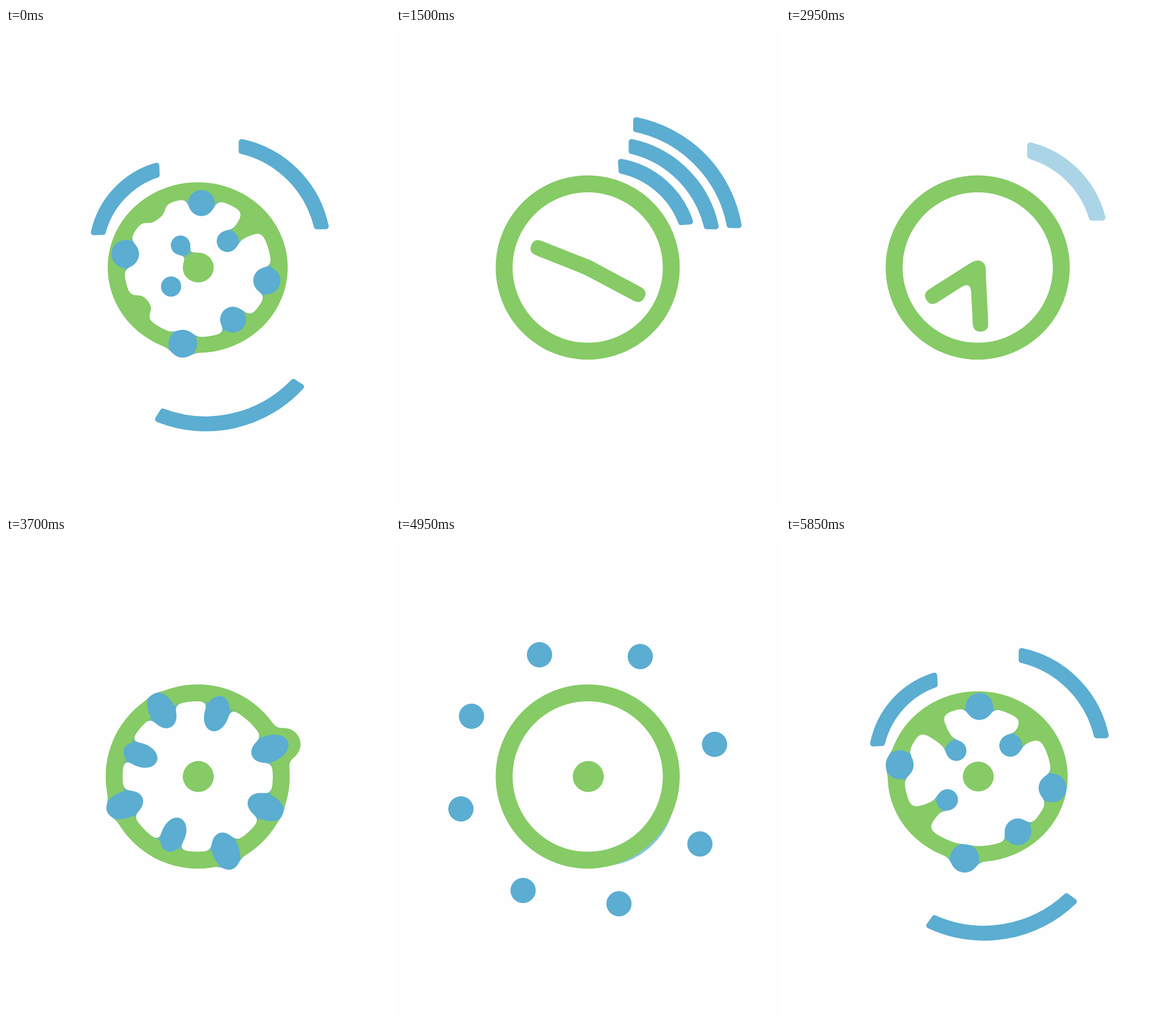
Write an HTML page that moves like this. It is 669x837 px and loops after 5900 ms.

```html
<!DOCTYPE html>
<html lang="en">
<head>
<meta charset="utf-8">
<title>Dots, clock and waves</title>
<style>
  html, body { margin: 0; width: 100%; height: 100%; overflow: hidden; background: #fefefe; }
  svg { display: block; width: 669px; height: 837px; }
</style>
</head>
<body>
<svg viewBox="0 0 669 837">
  <filter id="goo" filterUnits="userSpaceOnUse" x="0" y="0" width="669" height="837" color-interpolation-filters="sRGB">
    <feGaussianBlur stdDeviation="7"/>
    <feColorMatrix values="1 0 0 0 0  0 1 0 0 0  0 0 1 0 0  0 0 0 20 -9.5" result="blob"/>
    <feComposite in="SourceGraphic" in2="blob" operator="atop"/>
  </filter>
  <g id="waves"></g>
  <g id="body" filter="url(#goo)"></g>
</svg>
<script>
const LOOP = 5900, STEP = 50, ORBIT = 228;
const GREEN = '#86cb66', BLUE = '#5badd1';
const waves = document.getElementById('waves'), body = document.getElementById('body');

const clamp = x => Math.max(0, Math.min(1, x));
const mix = (a, b, x) => a + (b - a) * x;
const sine = x => (1 - Math.cos(Math.PI * clamp(x))) / 2;
const quad = x => (x = clamp(x)) < .5 ? 2 * x * x : 1 - 2 * (1 - x) ** 2;
// Eased progress of a move that begins at a given time
const ease = (t, from, length) => sine((t - from) / length);

// Rounded arc pointing along +x: chord distance, half chord, bulge
function arcPath(u, h, bulge) {
  const R = (h * h + bulge * bulge) / (2 * bulge), a = Math.asin(h / R), c = Math.SQRT1_2;
  const ox = u - 5 * c + 5 * Math.sin(a), oy = h - 5 * c - 5 * Math.cos(a);
  const ix = ox - 16 * c, iy = oy - 16 * c;
  const s = u + bulge - 21 - ix, r = (iy * iy + s * s) / (2 * s);
  return `M${ox} ${-oy}A${R - 5} ${R - 5} 0 0 1 ${ox} ${oy}L${ix} ${iy}A${r} ${r} 0 0 0 ${ix} ${-iy}Z`;
}

// From the inside out: starting scale, time of fading away, angle
const ARCS = [
  { small: .78, leave: 2600, angle: T => mix(-138, -45, sine(clamp((T - 5840) / 1900) ** .75)) },
  { small: .64, leave: 2200, angle: () => -45 },
  { small: .562, leave: 2000, angle: T => mix(mix(49, 95, ease(T, 4900, 520)), -45, ease(T, 5420, 2070)) }
];

function drawWaves(t) {
  const T = t < 4500 ? t + LOOP : t;
  waves.innerHTML = ARCS.map((arc, k) => {
    const out = ease(T - LOOP, arc.leave, 700);
    const grow = mix(arc.small, 1, ease(T, 4900, 800));
    const alpha = clamp((T - 4900) / 70) * (1 - out);
    return alpha <= 0 ? '' : `<path d="${arcPath(178 + 31 * k, 87.5 + 24 * k, 26 + 9 * k)}"
      fill="${BLUE}" stroke="${BLUE}" stroke-width="10" stroke-linejoin="round" opacity="${alpha}"
      transform="translate(336.5 419) rotate(${arc.angle(T)}) translate(${36 * out}) scale(${grow * (1 + .22 * out)})"/>`;
  }).join('');
}

// Angle on the orbit, distance from the centre when the loop begins
const DOTS = [
  [-112, 112], [-66.7, 69], [-14.6, 122], [30.6, 109],
  [75.8, 135], [119.2, 57], [165.3, 128], [-153, 49]
];

const ellipse = (x, rx, ry, fill) => `<ellipse cx="${x}" rx="${rx}" ry="${ry}" fill="${fill}"/>`;
const turned = (deg, inner) => `<g transform="rotate(${deg})">${inner}</g>`;

// Green neck pulled from the ring by a returning dot; it snaps back near the centre
function neck(r) {
  const held = r > 58, tip = held ? r : 108 + .8 * (58 - r);
  if (r > 118 || tip > 134) return '';
  const w = held ? 9 + Math.max(0, r - 90) * .5 : 14, bend = Math.max(tip, 112);
  return `<path d="M136 -30Q${bend} ${-w - 3} ${tip} ${-w}V${w}Q${bend} ${w + 3} 136 30Z" fill="${GREEN}"/>`;
}

function drawBody(t) {
  const T = t < 3000 ? t + LOOP : t, since = T - LOOP;
  const spin = 31.8 * Math.max(0, (T - 3400) / 2500) ** 3.2 - 6.5;
  let necks = '', dots = '';
  if (T > 3300 && since < 750) for (const [angle, start] of DOTS) {
    // The dots that come home first are the last to leave
    const x = (T - 3437 + .53 * start) / 600;
    const home = start - .19 * since - .0003 * Math.max(0, since) ** 2;
    const r = Math.min(ORBIT * quad(x), home);
    if (r <= 0) continue;
    const pull = Math.sin(Math.PI * clamp(x));
    const size = r < 140 ? 14.3 + .08 * r : Math.max(23, 25.5 - (r - 140) * .03);
    if (T > 5000) necks += turned(angle + spin, neck(r));
    dots += turned(angle + spin, ellipse(r, size * (1 + .38 * pull), size * (1 - .08 * pull), BLUE));
  }
  // Bulge pushed through the ring
  const push = Math.sin(Math.PI * clamp((t - 3575) / 250));
  necks += turned(-20.4, ellipse(100 + 61 * push, 29 * push, 29 * push, GREEN));

  const reach = ease(t, 1200, 250) * (1 - ease(t, 3000, 250));
  const hand = (deg, len) => reach <= 0 ? '' :
    turned(deg, `<path d="M0 0H${len * reach}" stroke="${GREEN}" stroke-width="27"/>`);
  const fed = t < 2000 ? 8.5 * ease(t, 0, 550) : 0;
  const core = mix(27.8 + fed, 13.8, reach);
  const squash = ease(T, 5400, 450) * (1 - ease(since, 0, 600));

  body.innerHTML = `<g transform="translate(334 416.8)">
    <g transform="scale(${1 - .022 * squash} ${1 - .075 * squash})">
      <circle r="145.8" fill="none" stroke="${GREEN}" stroke-width="29.5"/>${necks}</g>
    ${dots}
    ${hand(201.6 + (t - 1500) * .211, 106)}${hand(28 + (t - 1500) * .0408, 112)}
    ${ellipse(1, core, core * (1 - .04 * squash), GREEN)}</g>`;
}

const begin = performance.now();
function frame() {
  const t = Math.floor((performance.now() - begin) % LOOP / STEP) * STEP;
  drawWaves(t);
  drawBody(t);
  requestAnimationFrame(frame);
}
frame();
</script>
</body>
</html>
```
